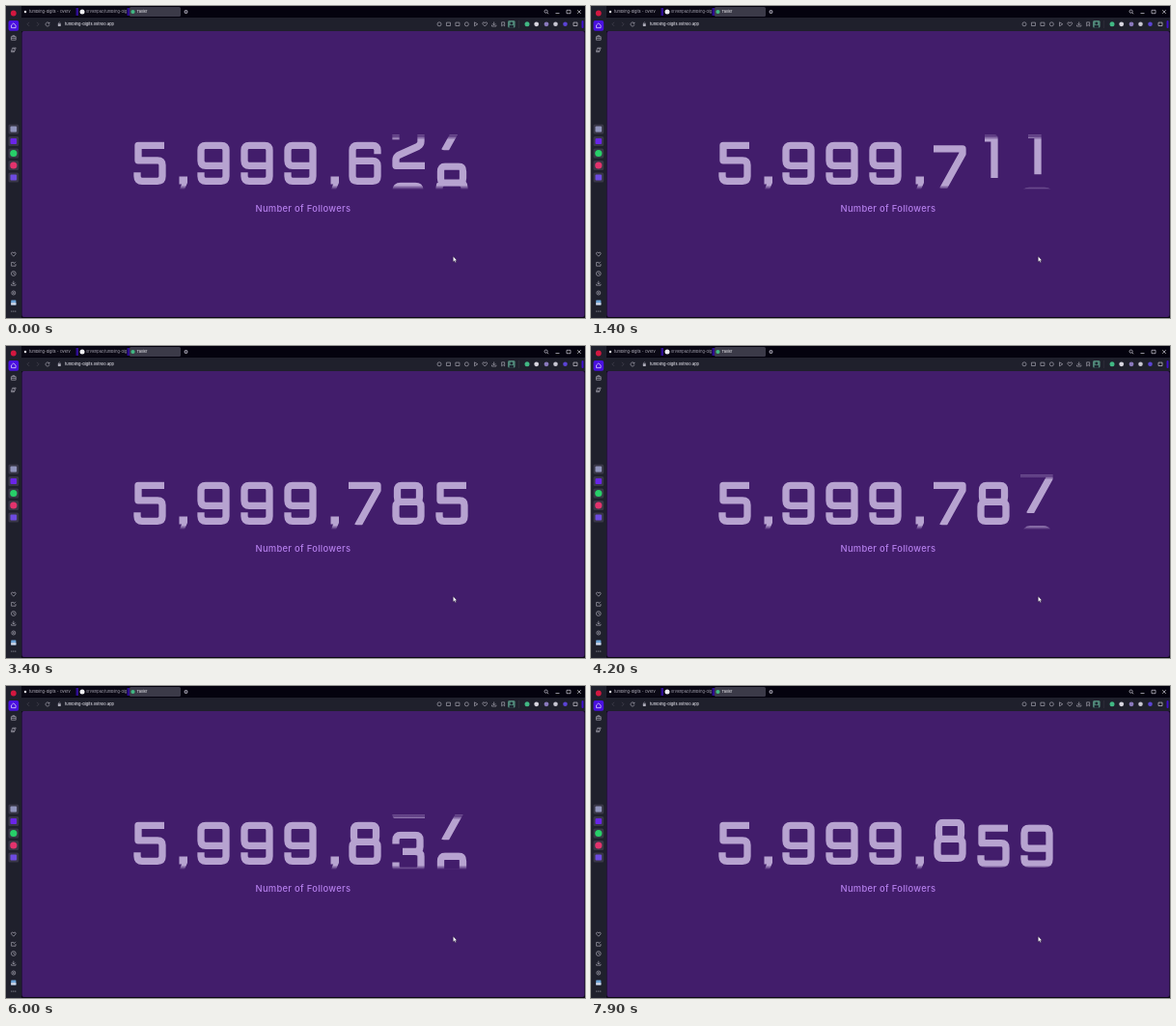
An HTML page with a canvas for the animation above (8000 ms loop, 600 by 323 pixels).

```html
<!DOCTYPE html>
<html lang="en">
<head>
<meta charset="utf-8">
<title>Rolling digits</title>
<style>
html, body { margin: 0; width: 100%; height: 100%; overflow: hidden; background: #421d6b; }
canvas { display: block; width: 600px; height: 323px; }
</style>
</head>
<body>
<canvas id="stage"></canvas>
<script>
const W = 600, H = 323, LOOP = 8000, STEP = 100;
const PAGE = '#421d6b', INK = '#b7a3d0', BAR = '#1f202c', ICON_INK = '#adacb9';
const TOP = 140.3, PITCH = 58, WIN_TOP = 133.5, WIN_END = 190;
const SANS = 'Inter, Roboto, sans-serif';

const canvas = document.getElementById('stage');
const ratio = window.devicePixelRatio || 1;
canvas.width = W * ratio;
canvas.height = H * ratio;
const g = canvas.getContext('2d');
g.scale(ratio, ratio);

// Centre lines of the digits in a 34 x 45 cell
const GLYPHS = [
  'M9 4H25Q30 4 30 9V36Q30 41 25 41H9Q4 41 4 36V9Q4 4 9 4Z',
  'M8 4H18V46',
  'M4 14V9Q4 4 9 4H25Q30 4 30 9V16Q30 19 27 21L7 30Q4 32 4 35V41H34',
  'M4 13V9Q4 4 9 4H24Q29 4 29 9V16Q29 21 24 21H11M24 21Q30 21 30 26V36Q30 41 25 41H9Q4 41 4 36V32',
  'M11 -1L4 28V34H34M25 15V46',
  'M32 4H5V19.5H25Q30 19.5 30 24.5V36Q30 41 25 41H9Q4 41 4 36V32',
  'M30 13V9Q30 4 25 4H9Q4 4 4 9V36Q4 41 9 41H25Q30 41 30 36V25Q30 20 25 20H4',
  'M0 4H30V9L9.4 46',
  'M10 4H24Q28.5 4 28.5 9V16Q28.5 21 24 21H10Q5.5 21 5.5 16V9Q5.5 4 10 4ZM9 21H25Q30 21 30 26V36Q30 41 25 41H9Q4 41 4 36V26Q4 21 9 21Z',
  'M30 25H9Q4 25 4 20V9Q4 4 9 4H25Q30 4 30 9V36Q30 41 25 41H9Q4 41 4 36V32'
].map(d => new Path2D(d));

// Last three digits after each one-second update
const VALUES = [629, 634, 711, 785, 785, 788, 828, 856, 859, 948];
const LEAD = 153, ROLL = 800;

function rect(x, y, w, h, color) {
  g.fillStyle = color;
  g.fillRect(x, y, w, h);
}

function box(x, y, w, h, r, color) {
  g.fillStyle = color;
  g.beginPath();
  g.roundRect(x, y, w, h, r);
  g.fill();
}

function dot(x, y, r, color) {
  g.fillStyle = color;
  g.beginPath();
  g.arc(x, y, r, 0, 7);
  g.fill();
}

function line(d, x, y, color = ICON_INK, width = 0.65) {
  g.save();
  g.translate(x, y);
  g.strokeStyle = color;
  g.lineWidth = width;
  g.stroke(new Path2D(d));
  g.restore();
}

function text(str, x, y, size, color, weight = 400, spacing = 0) {
  g.font = `${weight} ${size}px ${SANS}`;
  g.letterSpacing = spacing + 'px';
  g.fillStyle = color;
  g.fillText(str, x, y);
}

const ICON = {
  ring: 'M2 0A2 2 0 1 1 -2 0A2 2 0 1 1 2 0',
  box: 'M-2 -1.7H2V1.7H-2Z',
  heart: 'M0 2.2L-2.3 -.2Q-2.6 -2 -1.2 -2Q-.3 -2 0 -1Q.3 -2 1.2 -2Q2.6 -2 2.3 -.2Z',
  play: 'M-1.3 -2L2 0L-1.3 2Z',
  save: 'M0 -2.3V1L-1.5 -.5M0 1L1.5 -.5M-2.2 .8V2.2H2.2V.8',
  find: 'M1.2 -.4A1.6 1.6 0 1 1 -2 -.4A1.6 1.6 0 1 1 1.2 -.4M.8 .8L2.2 2.2',
  home: 'M-2.3 -.4L0 -2.4L2.3 -.4V2.3H-2.3Z',
  cross: 'M-1.8 -1.8L1.8 1.8M1.8 -1.8L-1.8 1.8',
  back: 'M1 -2L-1 0L1 2',
  next: 'M-1 -2L1 0L-1 2',
  dash: 'M-2 1.5H2',
  sheets: 'M-1 -2.2H2.4L1.2 1H-2.2ZM-2.2 1V2.2H.6L1.2 1M-.4 -1H1.2',
  mark: 'M-1.5 -2H1.5V2L0 .7L-1.5 2Z',
  clock: 'M2.4 0A2.4 2.4 0 1 1 -2.4 0A2.4 2.4 0 1 1 2.4 0M0 -1.4V0L1 .7'
};

function drawTabs() {
  rect(16, 0, W - 16, 12, '#04020e');
  rect(16, 1, 56, 10, '#0a0814');
  box(75, 1, 50, 10, 1, '#0a0814');
  rect(72.5, 2, 2.5, 8, '#2d0c91');
  rect(125.5, 2, 2.5, 8, '#2d0c91');
  box(128, 1, 53, 10, 1.5, '#3b3a48');
  dot(20, 6, 1.2, '#f0eff5');
  text('tumbling-digits - Overv', 24, 7.3, 3.9, '#b8b6c2');
  dot(79, 6, 2.5, '#eeeef4');
  text('orvlenpaz/tumbling-dig', 83, 7.3, 3.8, '#aaa8b6');
  dot(131.5, 6, 2.1, '#41b883');
  text('Tallier', 135.5, 7.3, 3.9, '#f0eff5');
  dot(186.5, 6, 2, '#9a98a6');
  line('M-1 0H1M0 -1V1', 186.5, 6, '#04020e', 0.6);
  line(ICON.find, 560, 6, '#dddbe6');
  line(ICON.dash, 571.5, 6, '#dddbe6');
  line(ICON.box, 583, 6, '#dddbe6');
  line(ICON.cross, 594, 6, '#dddbe6');
}

function drawAddress() {
  rect(16, 12, W - 16, 14, BAR);
  line(ICON.back, 23, 18.8, '#4c4b58');
  line(ICON.next, 33, 18.8, '#4c4b58');
  line('M1.8 -.8A2 2 0 1 0 2 .6M2 -2V-.7H.7', 43, 18.8);
  box(53.8, 18.3, 3, 2.6, 0.4, ICON_INK);
  line('M-.9 0V-1Q0 -2.4 .9 -1V0', 55.3, 18.5, ICON_INK, 0.5);
  text('tumbling-digits.ostrelo.app', 61, 20.3, 3.95, '#e0dfe8', 500);
  const tools = ['ring', 'box', 'box', 'ring', 'play', 'heart', 'save', 'mark'];
  tools.forEach((name, i) => line(ICON[name], 449 + i * 9.45, 18.8));
  box(520, 15, 7.6, 7.6, 1.5, '#4f8577');
  dot(523.8, 18, 1.4, '#1d2430');
  rect(521.7, 20, 4.2, 2.6, '#1d2430');
  rect(531, 15, 0.6, 8, '#34323f');
  dot(540, 18.8, 2.5, '#41b883');
  dot(549.7, 18.8, 2.4, '#d8d6e0');
  dot(560, 18.8, 2.4, '#8a79bd');
  dot(569.5, 18.8, 2.3, '#c8c6d2');
  dot(579.5, 18.8, 2.3, '#5b43d6');
  line(ICON.box, 590, 18.8, '#d8d6e0');
  box(596.5, 15, 2, 8, 1, '#3f0ed0');
}

function drawSidebar() {
  rect(0, 0, 16, H, BAR);
  dot(7.8, 7.5, 2.9, '#d3173f');
  box(2.5, 15, 10.7, 10.7, 2, '#4a10e0');
  line(ICON.home, 7.8, 20.3, '#f2f0fa');
  line('M-2.4 -1.3H2.4V2.2H-2.4ZM-1 -1.3V-2.3H1V-1.3M-2.4 .3H2.4', 7.8, 33);
  line(ICON.sheets, 7.8, 45.5);
  ['#8f93bb', '#6a25e8', '#28cf69', '#e2336d', '#6d4ae0'].forEach((color, i) => {
    const y = 127.5 + i * 12.5;
    box(2.5, y - 5, 10.7, 10, 1.6, '#393747');
    i === 2 || i === 3 ? dot(7.8, y, 3.6, color) : box(4.5, y - 3, 6.6, 6, 1, color);
  });
  line(ICON.heart, 7.8, 257);
  line('M-2.2 -1.6H.5M2.2 0V2.2H-2.2V-1.6M0 0L2.2 -2.2', 7.8, 267);
  line(ICON.clock, 7.8, 277);
  line(ICON.save, 7.8, 287);
  line(ICON.ring, 7.8, 297);
  dot(7.8, 297, 0.8, ICON_INK);
  box(5.2, 304.5, 5.2, 5, 0.6, '#6da4d8');
  rect(5.2, 307.3, 5.2, 2.2, '#d8d9e6');
  for (let i = -1; i < 2; i++) dot(7.8 + i * 2, 316, 0.6, ICON_INK);
}

function drawFrame() {
  rect(0, 0, W, H, '#0b0814');
  drawTabs();
  drawAddress();
  drawSidebar();
  box(16.5, 26, W - 17, 296, 2, PAGE);
}

function glyph(n, x, y) {
  g.save();
  g.translate(x, y);
  g.beginPath();
  g.rect(0, 0, 34, 45);
  g.clip();
  g.stroke(GLYPHS[n]);
  g.restore();
}

function column(x, value) {
  const low = Math.floor(value);
  for (let n = low; n <= Math.min(9, low + 1); n++) {
    glyph(n, x, TOP + (n - value) * PITCH);
  }
}

function comma(x) {
  g.fillStyle = INK;
  g.fill(new Path2D(`M${x + 1.5} 176.5H${x + 10}V183L${x + 7} 190H${x + 2}L${x + 4} 184.5H${x + 1.5}Z`));
}

function fade(edge, inner) {
  const shade = g.createLinearGradient(0, edge, 0, inner);
  shade.addColorStop(0, PAGE);
  shade.addColorStop(1, PAGE + '00');
  g.fillStyle = shade;
  g.fillRect(128, Math.min(edge, inner), 356, Math.abs(inner - edge));
}

// The CSS "ease" curve, solved by bisection
function ease(x) {
  if (x >= 1) return 1;
  let lo = 0, hi = 1, s;
  for (let i = 0; i < 24; i++) {
    s = (lo + hi) / 2;
    const q = 1 - s;
    if (0.75 * q * s + s * s * s < x) lo = s; else hi = s;
  }
  const q = 1 - s;
  return 0.3 * q * q * s + 3 * q * s * s + s * s * s;
}

function digitAt(number, place) {
  return Math.floor(number / 10 ** place) % 10;
}

function drawDigits(t) {
  const k = Math.floor((t + LEAD) / 1000);
  const p = ease(((t + LEAD) % 1000) / ROLL);
  g.save();
  g.beginPath();
  g.rect(120, WIN_TOP, 370, WIN_END - WIN_TOP);
  g.clip();
  g.strokeStyle = INK;
  g.lineWidth = 7.3;
  g.lineJoin = 'round';
  glyph(5, 132, TOP);
  comma(178);
  [198, 243, 288].forEach(x => glyph(9, x, TOP));
  comma(335);
  [355, 400, 445].forEach((x, i) => {
    const from = digitAt(VALUES[k], 2 - i), to = digitAt(VALUES[k + 1], 2 - i);
    column(x, from + (to - from) * p);
  });
  fade(WIN_TOP, 138.5);
  fade(WIN_END, 185.5);
  g.restore();
}

function drawCursor() {
  const arrow = new Path2D('M463.3 259V265L464.7 263.8L465.7 265.8L466.6 265.3L465.7 263.4H467.4Z');
  g.fillStyle = '#fff';
  g.fill(arrow);
  g.strokeStyle = '#1a0b2c';
  g.lineWidth = 0.4;
  g.stroke(arrow);
}

const start = performance.now();

function draw() {
  const now = (performance.now() - start) % LOOP;
  drawFrame();
  drawDigits(Math.floor(now / STEP) * STEP);
  text('Number of Followers', 258.5, 213, 9.4, '#b57fec', 500, 0.3);
  drawCursor();
  requestAnimationFrame(draw);
}
draw();
</script>
</body>
</html>
```
